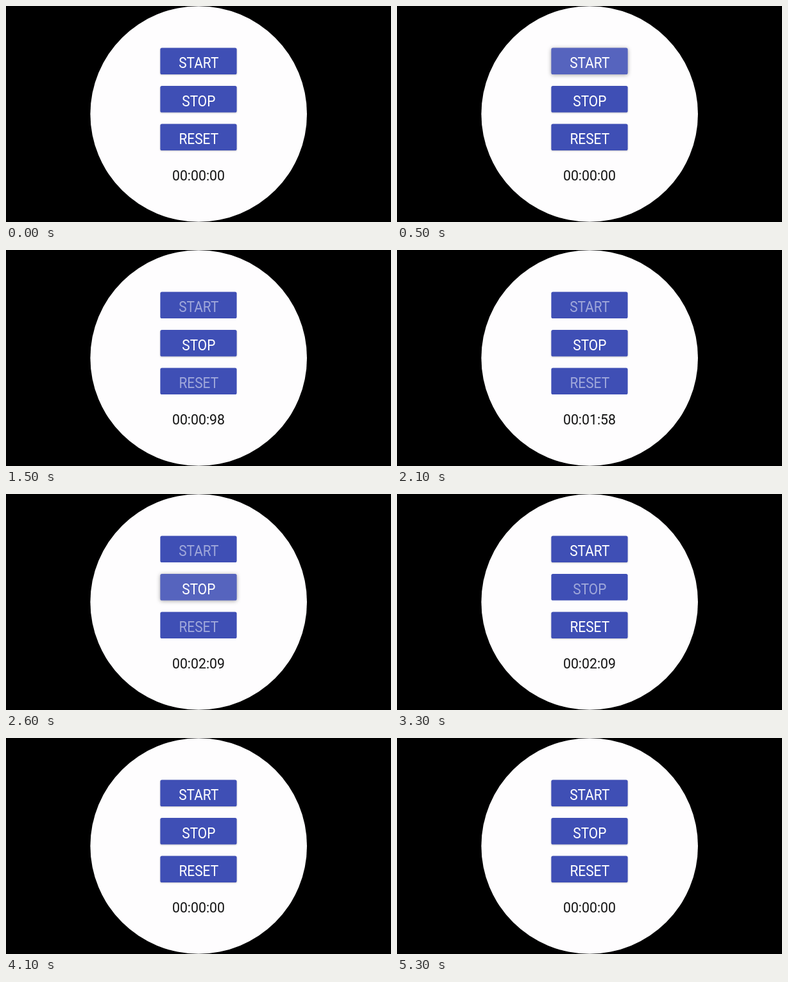
Write an HTML page that moves like this. It is 600 by 338 pixels and loops after 5500 ms.

```html
<!DOCTYPE html>
<html lang="en">
<head>
<meta charset="utf-8">
<title>Watch stopwatch</title>
<style>
  html, body { margin: 0; width: 100%; height: 100%; overflow: hidden; background: #000; }
  svg { display: block; width: 600px; height: 338px; }
  text { font-family: Roboto, sans-serif; text-anchor: middle; }
  .label { font-size: 24px; fill: #fff; }
  .time { font-size: 21.3px; fill: #111; }
</style>
</head>
<body>
<svg id="stage" viewBox="0 0 600 338">
  <rect width="600" height="338"/>
  <circle cx="300.2" cy="169" r="168.8" fill="#fefdfe"/>
  <text id="time" class="time" x="300" y="272.7">00:00:00</text>
</svg>
<script>
const LOOP = 5500, STEP = 100;
const stage = document.getElementById('stage');
const time = document.getElementById('time');

function add(parent, tag, attrs) {
  const node = document.createElementNS('http://www.w3.org/2000/svg', tag);
  for (const key in attrs) node.setAttribute(key, attrs[key]);
  return parent.appendChild(node);
}

function makeButton(label, y, pressedAt, isEnabled) {
  const box = { x: 240.4, y, width: 119.2, height: 41.6, rx: 2.6 };
  const base = add(stage, 'rect', { ...box, fill: '#3f4fb5' });
  const glow = add(stage, 'rect', { ...box, fill: '#fff' });
  // Condensed lettering: one horizontal scale shared by every label
  const text = add(stage, 'text', {
    class: 'label', transform: `translate(300.3 ${y + 31.8}) scale(.87 1)`
  });
  text.textContent = label;
  return { base, glow, text, pressedAt, isEnabled };
}

const buttons = [
  makeButton('START', 65.5, 400, t => t < 600 || t >= 2700),
  makeButton('STOP', 125, 2500, t => t < 2700 || t >= 3900),
  makeButton('RESET', 184.5, 3700, t => t < 600 || t >= 2700)
];

// Half lit on touch, full one step later, then fading over 300 ms
function pressLevel(elapsed) {
  if (elapsed < 0) return 0;
  if (elapsed < STEP) return 0.5;
  return Math.max(0, 1 - (elapsed - STEP) / 300);
}

function formatTime(t) {
  const running = t >= 600 && t < 3800;
  const count = running ? Math.min(209, Math.round(17 + (t - 700) * 0.10105)) : 0;
  const pad = n => String(n).padStart(2, '0');
  return `00:${pad(Math.floor(count / 100))}:${pad(count % 100)}`;
}

function render(t) {
  for (const { base, glow, text, pressedAt, isEnabled } of buttons) {
    const level = pressLevel(t - pressedAt);
    const enabled = isEnabled(t);
    glow.setAttribute('opacity', 0.12 * level);
    text.setAttribute('opacity', enabled ? 1 : 0.5);
    base.style.filter = enabled
      ? `drop-shadow(0 1px ${1 + 2 * level}px rgba(0,0,0,${0.2 + 0.15 * level}))`
      : 'none';
  }
  time.textContent = formatTime(t);
}

const start = performance.now();
function tick() {
  const t = (performance.now() - start) % LOOP;
  render(Math.floor(t / STEP) * STEP);
  requestAnimationFrame(tick);
}
render(0);
requestAnimationFrame(tick);
</script>
</body>
</html>
```
